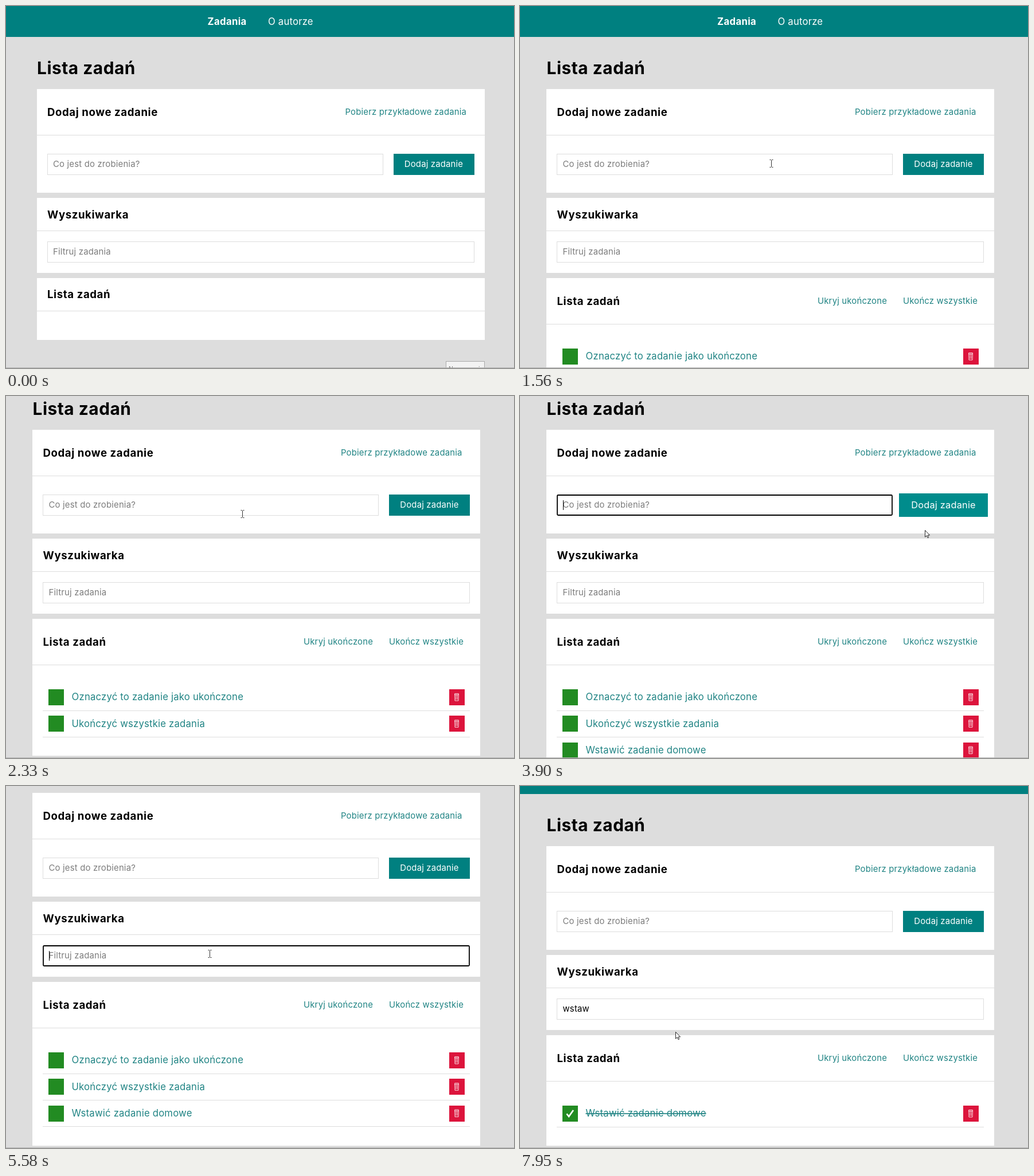
Write an HTML page that moves like this. It is 886x632 px and loops after 8 s.

```html
<!DOCTYPE html>
<html lang="pl">
<head>
<meta charset="utf-8">
<title>Lista zadań</title>
<style>
html, body { margin: 0; width: 100%; height: 100%; overflow: hidden; background: #ddd; }
svg { display: block; width: 886px; height: 632px; }
rect { shape-rendering: crispEdges; }
text { font-family: Montserrat, Inter, sans-serif; font-size: 14.9px; letter-spacing: .012em; white-space: pre; }
.nav { font-size: 16.7px; fill: #fff; }
.bold { font-weight: 700; letter-spacing: .022em; }
.title { font-size: 29.8px; font-weight: 700; letter-spacing: .018em; }
.head { font-size: 18.6px; font-weight: 700; letter-spacing: .032em; }
.link { fill: #208484; }
.item { fill: #208484; font-size: 16.7px; }
.done { text-decoration: line-through; }
.hint { fill: #7c7c7c; }
.white { fill: #fff; }
.tip { font-size: 10.5px; fill: #777; }
</style>
</head>
<body>
<svg id="stage" viewBox="0 0 886 632"></svg>
<script>
const LOOP = 8000, ROW = 46.3, BOX = 27.9;
const LEFT = 46, WIDTH = 781, IN = 64, FULL = 745;
const TEAL = '#008080', TEAL_LIGHT = '#008c8c', GREY = '#ddd';
const stage = document.getElementById('stage');
const TASKS = ['Oznaczyć to zadanie jako ukończone', 'Ukończyć wszystkie zadania', 'Wstawić zadanie domowe'];
const NEW_TASK = TASKS[2];

// event times in ms
const LOADED = 1200, FOCUS_ADD = 2460, TYPE = 2640, TYPED = 3200, ADDED = 3550;
const FOCUS_FILTER = 5160, BLUR = 7640, DONE = 7800;
const KEYS = [[5710, 'w'], [5910, 'ws'], [6240, 'wst'], [6300, 'wsta'], [6500, 'wstaw']];

// time, x, y, shape kept until the next point
const POINTER = [
  [140, 806, 640, 'arrow'], [350, 806, 328, 'arrow'], [540, 708, 190, 'hand'], [620, 700, 182, 'hand'],
  [920, 700, 182, 'hand'], [1010, 670, 196, 'arrow'], [1330, 470, 262, 'beam'], [1560, 438, 274, 'beam'],
  [1830, 438, 274, 'beam'], [2330, 412, 205, 'beam'], [2450, 400, 192, 'beam'], [3200, 400, 192, 'beam'],
  [3330, 662, 191, 'hand'], [3400, 732, 191, 'hand'], [3600, 732, 191, 'hand'], [3800, 722, 214, 'arrow'],
  [3900, 706, 234, 'arrow'], [4200, 560, 284, 'arrow'], [4310, 516, 298, 'beam'], [4390, 504, 300, 'beam'],
  [4700, 452, 304, 'beam'], [5160, 390, 296, 'beam'], [5580, 355, 292, 'beam'], [5710, 355, 292, 'arrow'],
  [6930, 355, 292, 'arrow'], [7200, 235, 420, 'arrow'], [7480, 96, 572, 'hand'], [7640, 86, 564, 'hand'],
  [7790, 86, 563, 'hand'], [7830, 120, 540, 'arrow'], [7950, 271, 429, 'arrow']
];

const SHAPES = {
  arrow: '<path d="M.5 .5V12.2L3.2 9.7L5.1 13.7L6.8 12.9L5 9H8.6Z" fill="#fff" stroke="#111" stroke-width=".9"/>',
  beam: '<path d="M-2.5-5.5h2l1 1 1-1h2M.5-4.5V6.5M-2.5 7.5h2l1-1 1 1h2" fill="none" stroke="#333"/>',
  hand: '<path d="M-1 0.5Q0-.6 1 .5V5l6 1.4Q8 7 7.6 9L6.4 14H0L-4 8.6Q-3.4 7-1 8.8Z" fill="#fff" stroke="#111" stroke-width=".9"/>'
};

const clamp = v => Math.max(0, Math.min(1, v));
const ease = (t, a, b) => { const p = clamp((t - a) / (b - a)); return p * p * (3 - 2 * p); };
const rect = (x, y, w, h, fill) => `<rect x="${x}" y="${y}" width="${w}" height="${h}" fill="${fill}"/>`;
const text = (x, y, s, cls, more = '') => `<text x="${x}" y="${y}" class="${cls}" ${more}>${s}</text>`;
const group = (x, y, body) => `<g transform="translate(${x} ${y})">${body}</g>`;
const panel = (y, end, line) => rect(LEFT, y, WIDTH, end - y, '#fff') + rect(LEFT, line, WIDTH, 1, GREY);

function filterText(t) {
  let s = '';
  for (const [at, str] of KEYS) if (t >= at) s = str;
  return s;
}

function caretOn(t, field) {
  if (field === 'add') {
    const from = t >= ADDED ? ADDED : t >= TYPED ? TYPED : 0;
    return (t >= TYPE && t < TYPED) || (t - from) % 1000 < 500;
  }
  if (t < KEYS[0][0]) return t - FOCUS_FILTER < 500;
  return t < 6500 || (t - 6260) % 1000 < 500;
}

function scrollAt(t, count) {
  const end = 40 + ROW * (count - 1);
  if (t < ADDED) return end * ease(t, 1790, 2010);
  if (t < KEYS[0][0]) return end - ROW * (1 - ease(t, 4300, 4520));
  return end;
}

function field(y, w, value, hint, focused) {
  const frame = focused
    ? `<rect x="${IN + 1}" y="${y + 1}" width="${w - 2}" height="35" rx="1.5" fill="#fff" stroke="#000" stroke-width="1.8" style="shape-rendering:auto"/>`
    : rect(IN, y, w, 37, GREY) + rect(IN + 1, y + 1, w - 2, 35, '#fff');
  const label = value ? text(74.5, y + 23, value, '', 'id="typed"') : text(74.5, y + 23, hint, 'hint');
  return frame + label;
}

function row(i, name, done) {
  const y = 598 + ROW * i;
  const bin = '<path d="M-3.5-6h7M-3.5-5.5L-3 6.5h6L3.5-5.5M-1.2-3.5V4.5M1.2-3.5V4.5M-3.5-4h7" fill="none" stroke="#fff" stroke-opacity=".85"/>';
  return rect(73.5, y, BOX, BOX, 'forestgreen') +
    (done ? group(73.5, y, '<path d="M8 14.2L11.7 19L19.5 8" fill="none" stroke="#fff" stroke-width="2.7"/>') : '') +
    text(114.5, y + 19.3, name, done ? 'item done' : 'item') +
    rect(772.5, y, BOX, BOX, 'crimson') + group(786, y + 13.5, bin) +
    rect(IN, y + 36.7, FULL, 1, GREY);
}

function button(t) {
  const k = 1 + .1 * (ease(t, 3320, 3400) - ease(t, 3900, 4150));
  const fill = k > 1.02 ? TEAL_LIGHT : TEAL;
  return `<g transform="translate(738.5 276.5) scale(${k})">` + rect(-70.5, -18.5, 141, 37, fill) +
    text(0, 4.8, 'Dodaj zadanie', 'white', 'text-anchor="middle"') + '</g>';
}

function pointer(t) {
  const n = POINTER.findIndex(p => p[0] > t);
  if (n === 0) return '';
  const b = POINTER[n < 0 ? POINTER.length - 1 : n];
  const a = n < 0 ? b : POINTER[n - 1];
  const p = a === b ? 0 : (t - a[0]) / (b[0] - a[0]);
  const mix = i => Math.round(a[i] + (b[i] - a[i]) * p);
  return group(mix(1), mix(2), SHAPES[a[3]]);
}

function draw(t) {
  const loaded = t >= LOADED;
  const query = filterText(t);
  const tasks = (loaded ? TASKS.slice(0, t >= ADDED ? 3 : 2) : [])
    .filter(s => s.toLowerCase().includes(query));
  const scroll = Math.round(scrollAt(t, tasks.length));
  const focus = t < FOCUS_ADD ? '' : t < FOCUS_FILTER ? 'add' : t < BLUR ? 'filter' : '';
  const entry = t < ADDED ? NEW_TASK.slice(0, Math.round(NEW_TASK.length * clamp((t - TYPE) / (TYPED - TYPE)))) : '';
  const linkHover = t >= 540 && t < 1010;
  const bottom = loaded ? 668 + ROW * (tasks.length - 1) : 583;

  let page = text(344, 33, 'Zadania', 'nav bold') + text(449.5, 33, 'O autorze', 'nav') +
    text(46.5, 119.3, 'Lista zadań', 'title') +
    panel(145, 326, 225) +
    text(64.5, 191.5, 'Dodaj nowe zadanie', 'head') +
    text(584, 189.5, 'Pobierz przykładowe zadania', 'link', linkHover ? `style="fill:${TEAL_LIGHT}"` : '') +
    field(258, 586, entry, 'Co jest do zrobienia?', focus === 'add') + button(t) +
    panel(335, 466, 392) +
    text(64.5, 370.5, 'Wyszukiwarka', 'head') +
    field(411, FULL, query, 'Filtruj zadania', focus === 'filter') +
    panel(475, bottom, loaded ? 555 : 532) +
    text(64.5, loaded ? 521.5 : 510, 'Lista zadań', 'head');
  if (loaded) {
    page += text(519, 520, 'Ukryj ukończone', 'link') + text(668, 520, 'Ukończ wszystkie', 'link');
    page += tasks.map((s, i) => row(i, s, s === NEW_TASK && t >= DONE)).join('');
  }
  if (focus && caretOn(t, focus)) {
    page += `<rect id="caret" x="74.5" y="${focus === 'add' ? 268 : 421}" width="1" height="17" fill="#000"/>`;
  }

  const tip = t < 140
    ? rect(767, 620, 68, 20, '#aaa') + rect(768, 621, 66, 20, '#f3f3f3') + text(772, 637, 'Nagrywanie', 'tip')
    : '';
  stage.innerHTML = rect(0, 0, 886, 632, GREY) + rect(0, -scroll, 886, 54, TEAL) +
    group(loaded ? 0 : 7.5, -scroll, page) + tip + rect(0, 631, 886, 1, '#b4b4b4') + pointer(t);

  const caret = document.getElementById('caret');
  const value = focus === 'add' ? entry : query;
  if (caret && value) caret.setAttribute('x', 74.5 + document.getElementById('typed').getComputedTextLength());
}

const start = performance.now();
function tick() {
  draw((performance.now() - start) % LOOP);
  requestAnimationFrame(tick);
}
tick();
</script>
</body>
</html>
```
